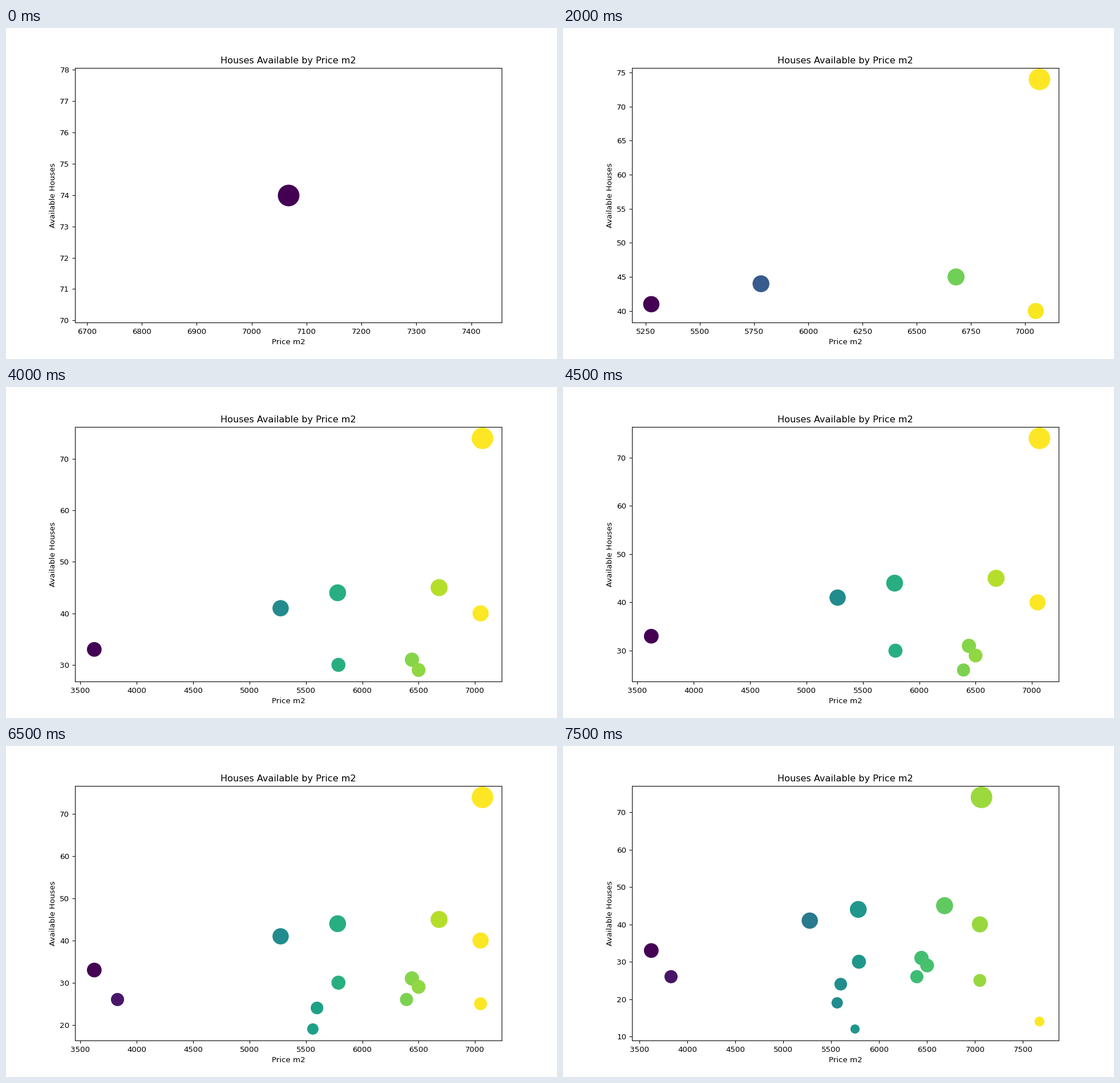
Recreate the animation shown at these times as a matplotlib script. Size 966 px wide and 580 px high, loop 8 s.

```python
import matplotlib.pyplot as plt
from matplotlib.animation import FuncAnimation

K = 0.966  # scale of a 10 x 6 inch chart on this stage

plt.rcParams.update({
    "font.family": "DejaVu Sans",
    "font.size": 10 * K,
    "axes.linewidth": 0.8 * K,
    "axes.titlepad": 6 * K,
    "axes.labelpad": 4 * K,
    "lines.linewidth": 1.5 * K,
})
for axis in ("xtick", "ytick"):
    plt.rcParams.update({
        f"{axis}.major.size": 3.5 * K,
        f"{axis}.major.width": 0.8 * K,
        f"{axis}.major.pad": 3.5 * K,
    })

# (price per m2, available houses), most houses first
AREAS = [
    (7067, 74), (6682, 45), (5782, 44), (5276, 41),
    (7050, 40), (3623, 33), (6441, 31), (5789, 30),
    (6500, 29), (6393, 26), (3829, 26), (7050, 25),
    (5599, 24), (5562, 19), (7672, 14), (5748, 12),
]

fig, ax = plt.subplots(figsize=(9.66, 5.8), dpi=100)


def draw(i):
    """Show the first i + 1 areas; axes and colours rescale to fit them."""
    price, houses = zip(*AREAS[:i + 1])
    ax.clear()
    ax.scatter(price, houses, s=[10 * n * K**2 for n in houses],
               c=price, cmap="viridis")
    ax.set_title("Houses Available by Price m2")
    ax.set_xlabel("Price m2")
    ax.set_ylabel("Available Houses")


anim = FuncAnimation(fig, draw, frames=len(AREAS), interval=500,
                     init_func=lambda: draw(0), repeat=True)
plt.show()
```
